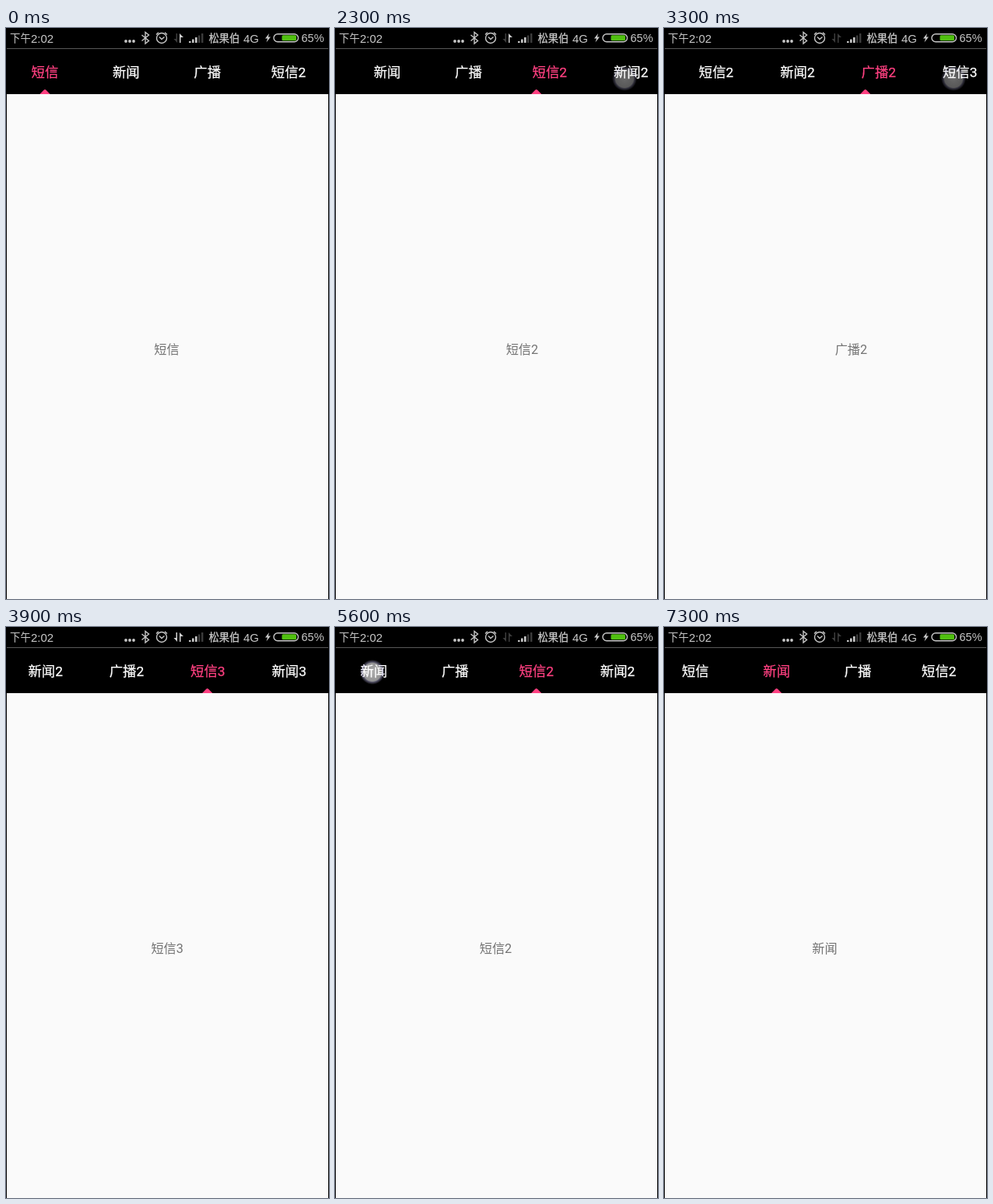
An HTML page for the animation above (7.6 s loop, 415 px wide and 734 px high).

```html
<!DOCTYPE html>
<html lang="zh">
<head>
<meta charset="utf-8">
<title>Tab indicator</title>
<style>
  html, body { margin: 0; width: 100%; height: 100%; overflow: hidden; background: #000; }
  svg { display: block; width: 415px; height: 734px; }
  text { font-family: Roboto, "Noto Sans CJK SC", "Noto Sans CJK", sans-serif; }
  #tabs { font-size: 17.4px; text-anchor: middle; stroke-width: .25; }
  #pages { font-size: 16.2px; text-anchor: middle; fill: #737373; }
  #status { fill: #c8c8c8; }
  #status text { font-family: "Liberation Sans", "Noto Sans CJK SC", "Noto Sans CJK", sans-serif; }
</style>
</head>
<body>
<svg viewBox="0 0 415 734">
  <defs>
    <clipPath id="screen"><rect x="1" width="413" height="734"/></clipPath>
    <radialGradient id="glow">
      <stop offset="0" stop-color="#fff" stop-opacity=".68"/>
      <stop offset=".72" stop-color="#fff" stop-opacity=".58"/>
      <stop offset=".82" stop-color="#bdb9ea" stop-opacity=".4"/>
      <stop offset="1" stop-color="#bdb9ea" stop-opacity="0"/>
    </radialGradient>
  </defs>
  <rect width="415" height="734"/>
  <rect x="1" y="26" width="413" height="1" fill="#585858"/>

  <g id="status">
    <text x="5" y="18" font-size="13.4">下午</text>
    <text x="32" y="18.5" font-size="15">2:02</text>
    <circle cx="154" cy="17" r="1.9"/><circle cx="159" cy="17" r="1.9"/><circle cx="164" cy="17" r="1.9"/>
    <g fill="none" stroke="#c8c8c8" stroke-width="1.4">
      <path d="M174.5 9L183.5 16.5L179 20V5.5L183.5 9L174.5 16.5"/>
      <circle cx="200" cy="13" r="6.5"/>
      <path d="M197 11.5L200 14.5L203.5 11.5M193 8.5L196 5.8M207 8.5L204 5.8"/>
      <rect x="344" y="7.7" width="31.5" height="10" rx="5"/>
    </g>
    <path id="down" d="M220 7V19L215.5 14H218.5V7Z"/>
    <path id="up" d="M223 19V7L228 12H224.5V19Z"/>
    <path d="M235 17h2.6v2h-2.6zM239 14.5h2.6v4.5h-2.6zM243 12h2.6v7h-2.6z"/>
    <path d="M247 9.5h2.4v9.5h-2.4zM251 7h2.4v12h-2.4z" fill="#3c3c3c"/>
    <text x="260.5" y="18" font-size="13.3" stroke="#c8c8c8" stroke-width=".3">松果伯</text>
    <text x="305" y="18.5" font-size="15">4G</text>
    <path d="M338 7L333 13.5H336L334.5 18.5L340 11.5H337Z"/>
    <rect x="354.5" y="9.2" width="18.5" height="7" rx="1.5" fill="#50c010"/>
    <text x="379.5" y="18.2" font-size="14.5">65%</text>
  </g>

  <g clip-path="url(#screen)">
    <g id="tabs"></g>
    <path id="mark" d="M-7.6 86L-1.2 79.4Q0 78.4 1.2 79.4L7.6 86Z" fill="#ff4081"/>
    <rect x="1" y="85" width="413" height="649" fill="#fafafa"/>
    <g id="pages"></g>
    <circle id="touch" r="16" fill="url(#glow)"/>
  </g>
</svg>
<script>
const LOOP = 7600, STEP = 100, LAG = 27;
const PITCH = 104.35, FIRST = 50, WIDTH = 413, MIDDLE = 206.5;
const TITLES = ["短信", "新闻", "广播"];

const $ = id => document.getElementById(id);
const progress = (t, start, length) => Math.min(1, Math.max(0, (t - start) / length));
const settle = u => 1 - (1 - u) ** 5;

// A tap glides to a page; a swipe drags by part of a page, then settles.
const tap = (at, to, x, y) =>
  ({ down: at - 90, start: at, release: at, drag: 0, to, x, y, linger: 210 });
const swipe = (down, start, release, drag, to, glide, x, y) =>
  ({ down, start, release, drag, to, glide, x, y, linger: 80 });

const gestures = [
  swipe(500, 500, 620, .33, 1, 750, 193, 529),
  swipe(1365, 1365, 1423, .5, 2, 494, 267, 539),
  ...[3, 4, 5, 6].map((to, i) => tap(2182 + 500 * i, to, 372, 67 - 2 * Math.abs(i - 1))),
  swipe(4400, 4540, 4620, -.35, 5, 230, 51, 493),
  tap(5095.5, 3, 61, 60),
  tap(5672, 1, 48, 58)
];
const lastTap = gestures[gestures.length - 1];

const dragged = (g, t) => g.drag && g.drag * progress(t, g.start, g.release - g.start);

function stateAt(t) {
  let page = 0, selected = 0;
  for (const g of gestures) {
    if (t < g.start) break;
    const from = selected;
    page = from + dragged(g, t);
    if (t < g.release) break;
    const glide = g.glide || 150 * (Math.abs(g.to - from) + 1);
    page += (g.to - page) * settle(progress(t, g.release, glide));
    selected = g.to;
  }
  return { page, selected };
}

function addLabels(parent, y) {
  return Array.from({ length: 9 }, (_, i) => {
    const label = document.createElementNS("http://www.w3.org/2000/svg", "text");
    const round = Math.floor(i / 3) + 1;
    label.textContent = TITLES[i % 3] + (round > 1 ? round : "");
    label.setAttribute("y", y);
    parent.appendChild(label);
    return label;
  });
}

function set(node, attributes) {
  for (const name in attributes) node.setAttribute(name, attributes[name]);
}

const tabs = addLabels($("tabs"), 63.2);
const pages = addLabels($("pages"), 419);

function drawStrip(t) {
  const { page, selected } = stateAt(t);
  const marked = stateAt(t - LAG).page;
  // the strip stops just short of its start once the marker passes the third slot
  const rest = t > lastTap.start ? 9.7 : 0;
  const scroll = Math.max(rest, (marked - 2) * PITCH);
  const tabX = i => FIRST + i * PITCH - scroll;

  tabs.forEach((tab, i) => {
    const color = i === selected ? "#ff4081" : "#fff";
    set(tab, { x: tabX(i), fill: color, stroke: color });
  });
  pages.forEach((label, i) => set(label, { x: MIDDLE + (i - page) * WIDTH }));
  set($("mark"), { transform: `translate(${tabX(marked)} 0)` });
}

// u: sending, b: both ways, -: idle
function drawTraffic(t) {
  const mode = "u-u-bb-b-"[Math.floor((t + 350) / 950)];
  const color = on => on ? "#d0d0d0" : "#3c3c3c";
  set($("down"), { fill: color(mode === "b") });
  set($("up"), { fill: color(mode !== "-") });
}

function drawTouch(t) {
  const g = gestures.find(g => t >= g.down && t < g.release + g.linger);
  if (!g) return set($("touch"), { opacity: 0 });
  const shift = dragged(g, t);
  set($("touch"), {
    cx: g.x - shift * WIDTH,
    cy: g.y - shift * 36,
    opacity: t > g.release + 100 ? .6 : 1
  });
}

const origin = performance.now();
function tick() {
  const now = (performance.now() - origin) % LOOP;
  const t = Math.floor(now / STEP) * STEP;
  drawStrip(t);
  drawTraffic(t);
  drawTouch(t);
  requestAnimationFrame(tick);
}
tick();
</script>
</body>
</html>
```
